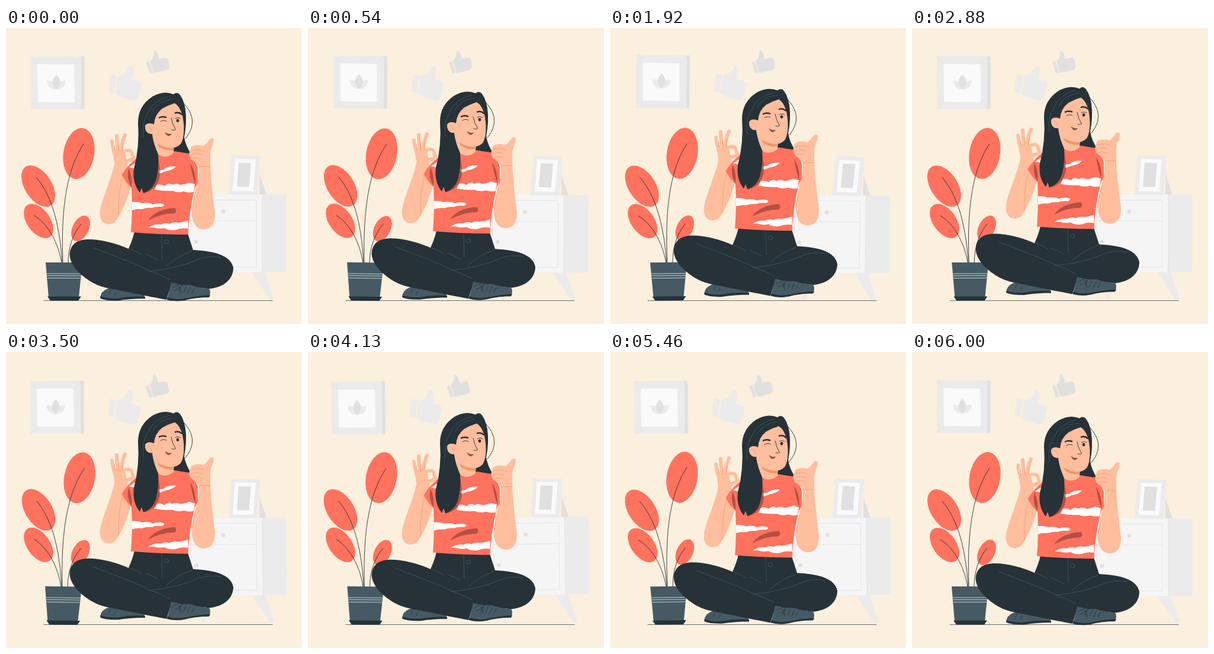
Recreate the animation shown at these times as an HTML page. Size 500 by 500 pixels, loop 6.04 s.

```html
<!DOCTYPE html>
<html lang="en">
<head>
<meta charset="utf-8">
<title>Thumbs up</title>
<style>
  html, body { margin: 0; width: 100%; height: 100%; overflow: hidden; background: #fbefdd; }
  svg { display: block; width: 100%; height: 100%; }
  .dark { fill: #263238; }
  .slate { fill: #455a64; }
  .coral { fill: #ff725e; }
  .skin { fill: #ffbe9d; }
  .white { fill: #fff; }
  .g0 { fill: #e0e0e0; }
  .g1 { fill: #ebebeb; }
  .g2 { fill: #f5f5f5; }
  .g3 { fill: #fafafa; }
  .shade { fill: #000; opacity: .3; }
  .line { fill: none; stroke: #263238; stroke-width: .9; stroke-linecap: round; stroke-linejoin: round; }
  .crease { fill: none; stroke: #455a64; stroke-width: .8; stroke-linecap: round; }
  .fold { fill: none; stroke: #eb996e; stroke-width: .7; stroke-linecap: round; }
  .edge { fill: none; stroke: #e0e0e0; stroke-width: .8; }
  .finger { fill: none; stroke: #ffbe9d; stroke-linecap: round; stroke-linejoin: round; }
  .brow { stroke-width: 2.5; }
</style>
</head>
<body>
<svg viewBox="0 0 500 500">
  <rect width="500" height="500" fill="#fbefdd"/>

  <g id="room">
    <!-- wall picture -->
    <path class="g0" d="M126 48H132.500V137H126Z"/>
    <path class="g1" d="M42 48H127V137H42Z"/>
    <path class="g3" d="M53 61L115 61.500 116 125.500 54 125Z"/>
    <path class="edge" d="M42 48L53 61M127 48L115 61.500M127 137L116 125.500M42 137L54 125"/>
    <path class="g1" d="M69 89Q84 88 85 104Q71 104 69 89ZM101 89Q86 88 85 104Q99 104 101 89Z"/>
    <path class="g0" d="M85 79Q98 92 85 104Q72 92 85 79Z"/>

    <!-- thumbs -->
    <path class="g1" d="M177 78L187 81 183 110 173 107Z"/>
    <path class="g1" d="M189 82C199 80 205 73 207 66Q212 62 215 69Q216 79 212 87L224 90Q229 92 228 97L223 117Q221 123 215 122L194 117 185 111Z"/>
    <path class="g0" d="M237 58L241.500 56 248.500 75 243 77Z"/>
    <path class="g0" d="M243.500 56Q250 51 249.500 41Q250 36 254 40Q258 45 257.500 52L269 50Q273.500 50 274 54L276 65Q276 70 271 71L250 76Z"/>

    <!-- cabinet -->
    <path class="g1" d="M337 411H352L333 459H327ZM414 411H437L452 457 447 460.500Z"/>
    <path class="g1" d="M432 281H473.500V411.500H432Z"/>
    <path class="g2" d="M303 281H433V412H303Z"/>
    <path class="edge" d="M312 290.500H423V403.500H312ZM312 326H423M433 281V412"/>
    <circle class="g0" cx="367" cy="310" r="3.300"/>
    <circle class="g0" cx="321" cy="361" r="3.300"/>
    <path class="g0" d="M428 246L440 281H428Z"/>
    <path class="g1" d="M381 215L429.500 216 424 282 376 281Z"/>
    <path class="g3" d="M387 221L422 222 417.500 276 383 275Z"/>
    <path class="g0" d="M393 227.500L414 228 410.500 268.500 390 268Z"/>
  </g>

  <path class="line" d="M64 460.500H450" opacity=".75"/>

  <g id="plant">
    <g id="leaves" class="coral"></g>
    <path class="line" d="M131 196C106 234 92 292 96 397M51 252C74 279 90 322 95 397M48 317C72 332 88 362 94 397M127 331C113 348 105 370 105 397"/>
    <path class="slate" d="M67 396H129L123 455H72Z"/>
    <path d="M69 415H127M69.500 418.500H126.500M70 422.500H126" stroke="#fff" stroke-width=".9" opacity=".8"/>
    <path class="dark" d="M70 453.500H127L122 460.500H75Z"/>
  </g>

  <g id="woman">
    <path class="dark" d="M284 111Q299 116 303 138Q306 160 301 184Q303 199 314 215L280 214 284 190Z"/>

    <!-- left arm -->
    <path class="skin" d="M184 224C180 252 163 285 159 308C156 330 172 336 184 328C195 314 205 289 211 268L205 238 205 224Z"/>
    <path class="fold" d="M190 318Q189 275 198 248"/>

    <!-- left shoe and trousers -->
    <path class="slate" d="M178 438Q163 442 160 451V456Q175 460 190 460Q212 455 235 457L232 444Z"/>
    <path class="dark" d="M159 453Q174 458 190 456.500Q212 452 235 454V457Q210 457 189 460.500Q170 461 159.500 457Z"/>
    <path class="line" d="M177 443L174 449M186 446L183 451"/>
    <path class="dark" d="M217 344C214 357 210 366 207 373C187 364 162 357 139 357C115 357 106 371 108 387C111 404 128 420 148 431C162 439 182 441 200 445C225 450 250 455 271 459L280 431Q315 438 343 440.500C370 438 384 423 384 405C380 385 355 377 316 375L306 344Z"/>
    <path class="crease" d="M147 371C182 385 222 399 242 410Q260 416 277 425M242 411Q293 406 327 390Q345 384 364 388M263 349L264 389M236 382Q247 386 257 392M271 402Q292 384 314 377M208 373Q221 377 229 383"/>
    <circle class="crease" cx="271" cy="361" r="3.500"/>

    <!-- right shoe -->
    <path class="slate" d="M279 430Q276 445 272 458Q283 462 294 461Q318 455 343 454Q347 446 343 440Q327 440 311 434Q294 435 279 430Z"/>
    <path class="dark" d="M272.500 455Q288 460 304 456.500Q324 452 345 451L343 455Q320 455 302 460Q285 463 271.500 459Z"/>
    <path class="line" d="M281 439Q292 430 298 434Q292 442 284 443M291 436Q298 446 294 449M296 436L292 445M304 437L300 447M311 438L307 448M318 440L314 448"/>

    <!-- shirt -->
    <path class="coral" d="M257 206Q236 213 219 221Q206 231 195.500 248Q203 262 212 270Q214 310 211 345Q260 349 307.500 349Q309 310 319 270L324 262V237Q318 217 309 212Q295 210 284 208Z"/>
    <path class="white" d="M258 240Q265 241 269 237Q276 233 287 234Q282 240 270 242L259 246Z"/>
    <path class="white" d="M255 265Q262 263 268 267Q275 260 281 265Q288 261 294 265Q304 264 309 261L319 264 317 277Q308 279 301 276Q289 279 282 275Q268 276 251 273Z"/>
    <path class="white" d="M212.500 294Q222 293 230 296Q242 294 248 298Q256 295 265 297Q270 299 264 302Q253 301 247 304Q238 303 230 306Q220 305 213 308Z"/>
    <path class="white" d="M241 337Q252 330 262 332Q269 328 276 331Q283 327 290 329Q300 328 307.500 325V339Q296 337 287 341Q276 343 268 338Q257 340 250 337Z"/>
    <path class="white" d="M208 235L219 228 216 237Z"/>
    <path class="shade" d="M256 220Q264 243 257 260Q250 275 234 279L226 266ZM207 237Q203 254 212 269Q214 253 207 237ZM311 228Q321 243 320 264Q315 252 311 228ZM240 325Q253 306 285 304Q290 309 285 313Q262 313 240 325Z"/>

    <!-- neck and face -->
    <path class="skin" d="M247 180L255 212Q269 223 283 211V193Z"/>
    <path class="skin" d="M248 150Q256 122 286 124Q298 138 300 160Q302 185 295 196Q286 205 272 202Q254 198 247 180Z"/>
    <path d="M256 195Q268 203 284 202.500L283.500 206Q270 209 258 200Z" fill="#eb996e"/>

    <!-- front hair -->
    <path class="dark" d="M283 112Q266 105 247 116Q223 132 223 160Q226 200 216 238Q213 262 226 278L229 270 232 279Q247 274 253 258Q259 235 257 213Q250 198 247 180L250 163Q251 146 264 136Q275 130 285 127Q294 132 299 150Q304 158 303.500 148Q303 125 294 113Q289 107 283 112Z"/>
    <path class="crease" d="M277 115Q250 121 240 143Q229 160 232 185M282 120Q257 122 248 141"/>
    <path class="line" d="M297 124C312 139 325 160 303 187" stroke-width=".7"/>
    <path class="skin" d="M251 163Q239 158 235 165Q234 176 243 179Q249 180 251 174Z"/>
    <path class="fold" d="M239 166Q244 166 246 174"/>
    <circle class="line" cx="243" cy="182" r="3"/>

    <path class="line brow" d="M259 151.500Q264 149 270 151M286 143.500Q292 141.500 297 146"/>
    <path class="line" d="M261 158Q266 154.500 271 157.500M286 153Q290 150 295 153M279 152Q281 163 286.500 171.500Q284 173.500 280 172" stroke-width="1.100"/>
    <ellipse class="dark" cx="290" cy="156.500" rx="2.300" ry="2.700"/>
    <path d="M269 177.500Q275 181 279 179.500Q277 184 272 181.500Z" fill="#b24f42"/>
    <path class="line" d="M269 177Q274 181 279 179.500" stroke-width=".7"/>

    <!-- left hand -->
    <path class="skin" d="M183 227L180 208Q190 200 201 207L203 219 205 229Z"/>
    <g id="fingers"></g>
    <path class="fold" d="M184 207L183 198M190 209L191 196M197 208Q195 202 198 195M202 223Q207 223 211 220"/>

    <!-- right arm and hand -->
    <path class="skin" d="M326 231L345 230C346 260 350 288 353 313C353 332 346 341 331 340C320 338 314 327 313.500 311C315 290 322 277 325 257Z"/>
    <path class="skin" d="M313 201Q320 196 334 199Q341 193 344 188Q348 184 351 188Q351 194 347 203Q344 211 345 222V234H326Q323 229 313 222Q308 216 310 208Z"/>
    <path class="fold" d="M314 207Q324 203 335 208M311 214Q321 210 331 214M314 221Q322 217 329 221M326 234H345M325 257Q317 285 315 305"/>
  </g>
</svg>
<script>
  const $ = id => document.getElementById(id);
  const LOOP = 6040;

  // centre x, centre y, half width, half height, tilt
  const leaves = [[123, 212, 26, 43.5, 10], [54.500, 267, 22.7, 39, -33], [55, 326, 19.4, 33, -36], [126, 338.5, 13.7, 23, 26]];
  $("leaves").innerHTML = leaves.map(([x, y, rx, ry, tilt]) =>
    `<ellipse rx="${rx}" ry="${ry}" transform="translate(${x} ${y}) rotate(${tilt})"/>`).join("");

  const fingers = [
    ["M179 191Q180 205 185 217", 5.5],
    ["M187 182Q187 198 191 213", 6],
    ["M201 181Q194 196 195 213", 6],
    ["M198 209Q207 204 212 209L214 217", 5.5],
    ["M199 225Q209 226 216 219", 5.5]
  ];
  $("fingers").innerHTML = fingers.map(([d, w]) =>
    `<path class="finger" d="${d}" stroke-width="${w}"/>`).join("");

  // Linear sway 0 → 1 → -1 → 0 over one period
  const sway = (t, period) => {
    const p = (t / period) % 1;
    return p < .25 ? p * 4 : p < .75 ? 2 - p * 4 : p * 4 - 4;
  };
  const lift = t => 1 - Math.abs(1 - (t / 3000) % 2);

  function draw(t) {
    $("room").setAttribute("transform", `rotate(${sway(t, 6000)} 250 250)`);
    $("plant").setAttribute("transform", `rotate(${sway(t, 3000)} 84 315)`);
    $("woman").setAttribute("transform", `translate(0 ${-10 * lift(t)})`);
  }

  const start = performance.now();
  function tick() {
    draw((performance.now() - start) % LOOP);
    requestAnimationFrame(tick);
  }
  tick();
</script>
</body>
</html>
```
